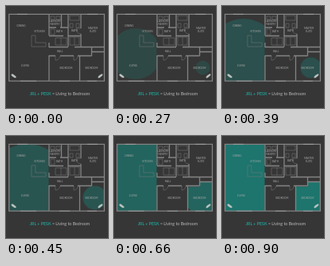
These frames come from a looping animation (128 by 128 pixels, 3.9 s). An HTML page:

```html
<!DOCTYPE html>
<html lang="en">
<head>
<meta charset="utf-8">
<style>
  html, body { margin: 0; width: 100%; height: 100%; overflow: hidden; background: #363636; }
  svg { display: block; width: 100vw; height: 100vh; }
  text { font-family: Lato, "Open Sans", sans-serif; text-anchor: middle; }
  #labels { font-size: 3.1px; fill: #a6a6a6; }
  .wall { fill: none; stroke: #838383; stroke-width: 1.3; }
  .thin { fill: none; stroke: #787878; stroke-width: .5; }
  .caption { font-size: 5.3px; fill: #b8b8b8; }
  .caption tspan { font-weight: 700; fill: #239c91; }
</style>
</head>
<body>
<svg viewBox="0 0 128 128">
  <clipPath id="living"><path d="M4 11H53.5V94H4Z"/></clipPath>
  <clipPath id="bedroom"><path d="M93 63.5H107.5V57.5H123V94H93Z"/></clipPath>
  <g id="fills" fill="#1d756d">
    <g clip-path="url(#living)"><circle id="big" cx="27" cy="60"/></g>
    <g clip-path="url(#bedroom)"><circle id="small" cx="111.5" cy="77.5"/></g>
  </g>

  <!-- walls with door gaps -->
  <path class="wall" d="M3.8 10.3H123.4V94.2H3.8Z
    M54 10.3V37 M54 46V52 M54 62V94.2
    M54 27H63 M68 27H78 M69.5 10.3V27
    M78 10.3V51 M54 37.5H72 M78 37.5H94 M94 10.3V28 M94 35V51.5
    M54 51.5H78 M86 51.5H123.4
    M54 62.5H62 M68 62.5H85 M90 62.5H107.5
    M92.5 62.5V94.2 M107.5 51.5V62.5 M107.5 57.5H123.4"/>

  <!-- counters, fixtures and doors -->
  <path class="thin" d="M32 37H37V46H50V51H32Z
    M56 13H61V17H56Z M63 13H68V17H63Z M56 29H61V36H56Z
    M80 12H92V18H80Z M80 22H84V27H80Z M88 22H92V27H88Z
    M62 40H76V49H62Z M69 40V49 M80 39H92V49H80Z M86 39V49
    M62 62.5V68 A6 6 0 0 0 68 62.5 M85 62.5V68 A5 5 0 0 0 90 62.5
    M94 28H88 A6 6 0 0 0 94 35"/>

  <!-- window breaks -->
  <path d="M14 10.3H27 M102 10.3H115 M18 94.2H38 M67 94.2H80 M102 94.2H114"
    fill="none" stroke="#b0b0b0" stroke-width=".6"/>

  <g fill="#b9c1be">
    <ellipse cx="9.7" cy="87.8" rx="3.6" ry="1.4" transform="rotate(35 9.7 87.8)"/>
    <ellipse cx="118.4" cy="87.8" rx="3.6" ry="1.4" transform="rotate(-40 118.4 87.8)"/>
  </g>
  <g id="labels"></g>
  <text class="caption" x="67.4" y="111.6"><tspan>JRL + PESK</tspan> = Living to Bedroom</text>
</svg>
<script>
  const byId = id => document.getElementById(id);
  const rooms = [
    ["DINING", 19, 25.5], ["KITCHEN", 42, 33], ["LIVING", 24, 75.7],
    ["LAUNDRY", 61.5, 19.5], ["PANTRY", 61.5, 23.5], ["BATH", 67, 33.3],
    ["BATH", 86, 31.7], ["MASTER", 109, 28.7], ["SUITE", 109, 32.7],
    ["HALL", 67.5, 58.3], ["BEDROOM", 75.5, 78.7], ["BEDROOM", 107.5, 78.7]
  ];
  byId("labels").innerHTML = rooms
    .map(([name, x, y]) => `<text x="${x}" y="${y}">${name}</text>`).join("");

  const LOOP = 3900, START = 180, STEP = 30, STEPS = 25;

  function draw(now) {
    const t = now % LOOP;
    const step = t < START ? 0 : Math.min(STEPS, Math.floor((t - START) / STEP) + 1);
    byId("fills").setAttribute("opacity", step && .15 + .85 * step / STEPS);
    byId("big").setAttribute("r", 20 + 3 * step);
    byId("small").setAttribute("r", 5 + step);
  }

  const start = performance.now();
  function tick() {
    draw(performance.now() - start);
    requestAnimationFrame(tick);
  }
  tick();
</script>
</body>
</html>
```
